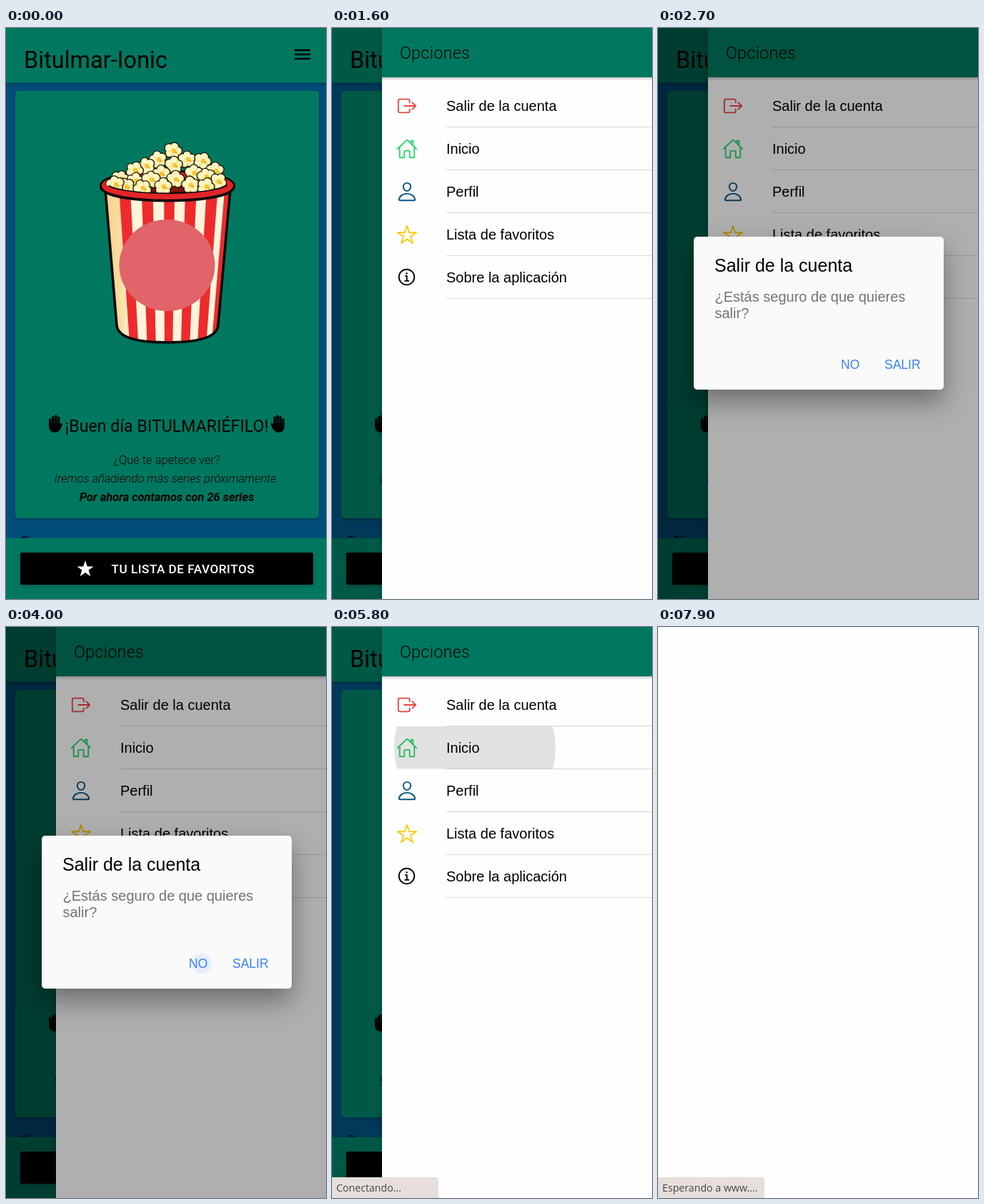
Animation, 448 px wide and 799 px high, one loop 8 s. Source, as an HTML page:

```html
<!DOCTYPE html>
<html lang="es">
<head>
<meta charset="utf-8">
<title>Bitulmar-Ionic</title>
<style>
html, body { margin: 0; width: 100%; height: 100%; overflow: hidden; background: #fff; }
svg { display: block; width: 100%; height: 100%; }
text { white-space: pre; }
.app { font-family: Roboto, Lato, sans-serif; }
.ui { font-family: "Liberation Sans", Arial, sans-serif; font-size: 20px; }
.status { font: 14.2px "Open Sans", "Noto Sans", sans-serif; }
.mid { text-anchor: middle; }
.bar { filter: drop-shadow(0 2px 2px rgba(0,0,0,.22)); }
.drawer { filter: drop-shadow(0 0 5px rgba(0,0,0,.22)); }
.dialog { filter: drop-shadow(0 17px 18px rgba(0,0,0,.38)); }
.icon { fill: none; stroke-width: 32; stroke-linecap: round; stroke-linejoin: round; }
</style>
</head>
<body>
<svg viewBox="0 0 448 799" preserveAspectRatio="none">
  <defs>
    <linearGradient id="shade">
      <stop offset="0" stop-color="#f6cf86"/>
      <stop offset=".13" stop-color="#fbdfa6"/>
      <stop offset=".2" stop-color="#fff4da"/>
      <stop offset="1" stop-color="#fff4da"/>
    </linearGradient>
    <linearGradient id="fade" x2="0" y2="1">
      <stop offset="0" stop-opacity=".2"/>
      <stop offset="1" stop-opacity="0"/>
    </linearGradient>
    <path id="tub" d="M139 226L155 416Q157 440 226 440Q295 440 297 416L314 226Z"/>
    <clipPath id="tubClip"><use href="#tub"/></clipPath>
    <clipPath id="rowClip"><rect x="70" y="139" width="378" height="59.5"/></clipPath>
    <g id="hand" stroke="#000" stroke-linecap="round" fill="none">
      <path stroke-width="3.4" d="M1.8 15V7M5.8 14V3.6M9.8 14V1.9M13.7 15V4.2"/>
      <path stroke-width="3" d="M13 21L17.6 13.6"/>
      <path fill="#000" stroke="none" d="M.1 12H15.4V15.5L18.6 14Q16 25 9 25Q.1 25 .1 16Z"/>
    </g>
  </defs>

  <g id="home" class="app">
    <rect width="448" height="799" fill="#004d78"/>
    <rect class="bar" width="448" height="76.5" fill="#00785f"/>
    <text x="25" y="56" font-size="32.5">Bitulmar-Ionic</text>
    <path d="M404 31H426M404 37H426M404 43H426" stroke="#000" stroke-width="2.4"/>
    <rect class="bar" x="13" y="88" width="425" height="598" rx="5" fill="#00785f"/>

    <use href="#tub" fill="url(#shade)"/>
    <g id="stripes" clip-path="url(#tubClip)" fill="#ee2a2c"></g>
    <use href="#tub" fill="none" stroke="#0b0b0b" stroke-width="3.6" stroke-linejoin="round"/>
    <ellipse cx="226" cy="221" rx="88.5" ry="15.5" fill="#7c1512" stroke="#0b0b0b" stroke-width="13"/>
    <ellipse cx="226" cy="221" rx="88.5" ry="15.5" fill="none" stroke="#e32428" stroke-width="7.5"/>
    <g id="corn"></g>
    <path d="M137.500 221A88.500 16 0 0 0 314.500 221" fill="none" stroke="#0b0b0b" stroke-width="13"/>
    <path d="M137.500 220A88.500 16 0 0 0 314.500 220" fill="none" stroke="#e32428" stroke-width="7.500"/>
    <ellipse cx="225.500" cy="332" rx="67" ry="64" fill="#e0646a"/>

    <use href="#hand" x="60" y="541"/>
    <use href="#hand" transform="translate(390 541) scale(-1 1)"/>
    <text class="mid" x="225" y="565" font-size="23.200">¡Buen día BITULMARIÉFILO!</text>
    <text class="mid" x="225" y="610" font-size="16.500" font-weight="300">¿Qué te apetece ver?</text>
    <g class="mid" font-size="16.400" font-style="italic">
      <text x="225" y="636" font-weight="300">Iremos añadiendo más series próximamente.</text>
      <text x="225" y="662" font-weight="600">Por ahora contamos con 26 series</text>
    </g>

    <text x="21" y="723" font-size="16">Si</text>
    <rect y="714" width="448" height="85" fill="#00785f"/>
    <rect class="bar" x="20" y="734" width="410" height="45" rx="2"/>
    <path d="M111 745l2.800 8.400h8.800l-7 5.200 2.700 8.600-7.300-5.200-7.300 5.200 2.700-8.600-7-5.200h8.800z" fill="#fff"/>
    <text x="147.500" y="763" font-size="17.200" font-weight="500" letter-spacing=".5" fill="#fff">TU LISTA DE FAVORITOS</text>
  </g>

  <rect id="dim" width="448" height="799"/>

  <g id="menu">
    <rect class="drawer" width="378" height="799" fill="#fefefe"/>
    <rect width="378" height="69" fill="#00785f"/>
    <rect y="69" width="378" height="5" fill="url(#fade)"/>
    <text class="app" x="25" y="43" font-size="23.500" font-weight="300" letter-spacing=".2">Opciones</text>
    <g id="items" class="ui"></g>
  </g>
  <g clip-path="url(#rowClip)"><circle id="wave" cx="200" cy="169" fill-opacity=".11"/></g>

  <rect id="veil" width="448" height="799"/>
  <g id="alert" class="ui">
    <rect class="dialog" x="50" y="292" width="350" height="214" rx="5" fill="#fafafa"/>
    <text x="79" y="341" font-size="25">Salir de la cuenta</text>
    <g fill="#737373">
      <text x="79.500" y="383">¿Estás seguro de que quieres</text>
      <text x="79.500" y="406">salir?</text>
    </g>
    <circle id="tap" cx="274" cy="471" r="14" fill="#3880ff" fill-opacity=".09"/>
    <g fill="#3880ff" font-size="17.500">
      <text x="256" y="477">NO</text>
      <text x="317" y="477">SALIR</text>
    </g>
  </g>

  <rect id="blank" width="448" height="799" fill="#fefefe"/>
  <g id="status">
    <path d="M0 770H144.500Q149 770 149 774.500V799H0Z" fill="#e6deda"/>
    <text id="note" class="status" x="6" y="790" fill="#484848"></text>
  </g>
</svg>
<script>
const $ = id => document.getElementById(id);
const clamp = v => Math.max(0, Math.min(1, v));
const show = (id, on) => $(id).setAttribute("visibility", on ? "visible" : "hidden");
const set = (id, name, value) => $(id).setAttribute(name, value);

// Red stripes: start and end as shares of the tapering width
const stripes = [[.11, .2], [.29, .38], [.47, .555], [.64, .73], [.81, .9], [.955, 1.02]];
const top_ = u => 139 + 175 * u, foot = u => 158 + 136 * u;
$("stripes").innerHTML = stripes.map(([a, b]) =>
  `<path d="M${top_(a)} 226L${foot(a)} 441H${foot(b)}L${top_(b)} 226Z"/>`).join("");

// Popcorn: each kernel is a ring of puffs around a golden heart
let seed = 11;
const rand = () => (seed = (seed * 16807) % 2147483647) / 2147483647;
const disc = (x, y, r, fill) =>
  `<circle cx="${x.toFixed(1)}" cy="${y.toFixed(1)}" r="${r.toFixed(1)}" fill="${fill}"/>`;

function kernel([x, y]) {
  const turn = rand() * 6.28;
  const puffs = [0, 1, 2, 3, 4].map(i => {
    const a = turn + i * 1.257;
    return [x + 6.8 * Math.cos(a), y + 6.2 * Math.sin(a), 4.6 + rand() * 1.4];
  });
  const edge = puffs.map(([px, py, r]) => disc(px, py, r + 1.3, "#17120a")).join("");
  const body = puffs.map(([px, py, r]) =>
    disc(px, py, r, "#f1dc8b") + disc(px - .6, py - .8, r - 1, "#fff6c4")).join("");
  return edge + body + disc(x, y, 5, "#fff3b4") + disc(x + 1, y, 3.2, "#f7c433")
    + disc(x + 4, y + 2, 1.7, "#f2b021");
}

const pile = [[234, 172], [213, 184], [254, 184], [275, 186], [196, 193], [180, 199], [235, 192],
  [293, 200], [160, 211], [217, 204], [263, 203], [280, 208], [297, 215], [181, 214], [203, 212],
  [237, 212], [258, 220], [220, 222], [168, 222], [191, 224], [280, 222], [153, 219]];
$("corn").innerHTML = pile.map(kernel).join("");

const items = [
  ["Salir de la cuenta", "#eb4545", "M320 176v-40a40 40 0 00-40-40H88a40 40 0 00-40 40v240a40 40 0 0040 40h192a40 40 0 0040-40v-40M384 176l80 80-80 80M191 256h273"],
  ["Inicio", "#2dd36f", "M80 212v236a16 16 0 0016 16h96V328a24 24 0 0124-24h80a24 24 0 0124 24v136h96a16 16 0 0016-16V212M480 256L267 52c-5-5-17-5-22 0L32 256M400 179V64h-48v69"],
  ["Perfil", "#0b5480", "M344 144c-4 53-44 96-88 96s-84-43-88-96c-4-55 35-96 88-96s92 42 88 96zM256 304c-87 0-175 48-192 139-2 11 4 21 16 21h352c11 0 18-10 16-21C431 352 343 304 256 304z"],
  ["Lista de favoritos", "#ffc909", "M480 208H308L256 48l-52 160H32l140 96-54 160 138-100 138 100-54-160z"],
  ["Sobre la aplicación", "#000", "M64 248a184 184 0 10368 0a184 184 0 10-368 0M220 220h32v116M208 340h88M246 160h4M242 156h12v8h-12z"]
];
$("items").innerHTML = items.map(([label, color, d], i) => `
  <g transform="translate(0 ${60 * i})">
    <path class="icon" transform="translate(20 94) scale(.0586)" stroke="${color}" d="${d}"/>
    <text x="90" y="116">${label}</text>
    <path d="M90 138.500H378" stroke="#d9d9d9"/>
  </g>`).join("");

function draw(time) {
  const t = Math.floor(time / 100) * 100; // the picture moves on a 10 fps grid

  const open = t < 1300 ? 0 : 1 - .27 * Math.pow(clamp((1600 - t) / 300), 1.65);
  show("menu", open > 0);
  set("menu", "transform", `translate(${(448 - 378 * open).toFixed(2)} 0)`);
  set("dim", "opacity", .26 * open);

  const enter = clamp((t - 2545) / 150), leave = clamp((t - 4020) / 150);
  const shown = enter * (1 - leave), scale = .9 + .1 * enter;
  show("alert", shown > 0);
  set("alert", "opacity", shown);
  set("alert", "transform", `translate(225 399) scale(${scale}) translate(-225 -399)`);
  set("veil", "opacity", .315 * shown);
  show("tap", t >= 4000 && shown > 0);

  show("wave", t >= 5800);
  set("wave", "r", 113 + 1.9 * Math.max(0, Math.min(t, 6000) - 5800));

  show("blank", t >= 6400);
  show("status", t >= 5800);
  const joining = t < 6000 || (t >= 7700 && t < 7900);
  $("note").textContent = joining ? "Conectando..." : "Esperando a www....";
}

function tick() {
  draw(performance.now() % 8000);
  requestAnimationFrame(tick);
}
tick();
</script>
</body>
</html>
```
